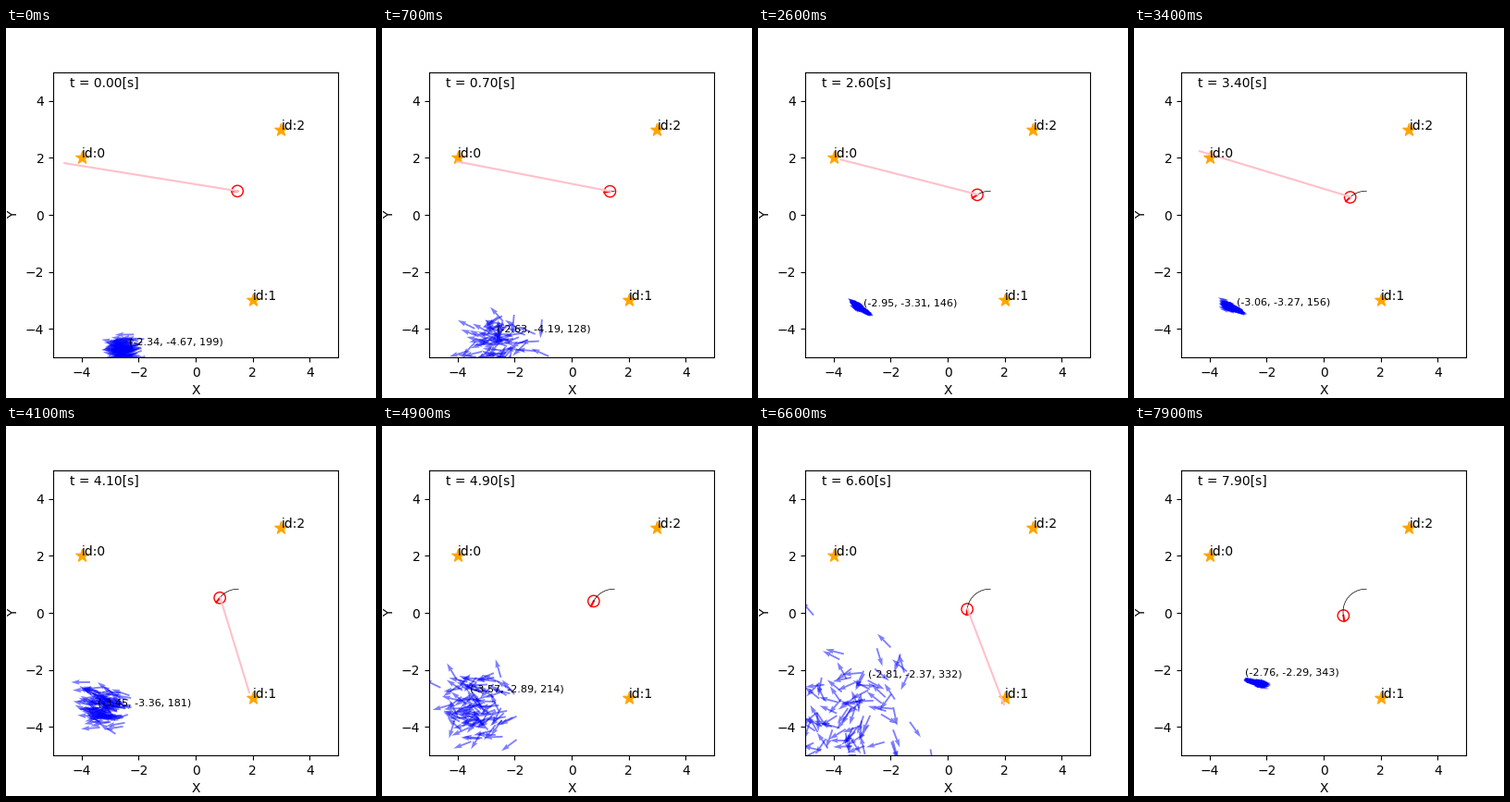
These frames come from a looping animation (400x400 px, 8 s). A matplotlib script:

```python
import numpy as np
import matplotlib.pyplot as plt
from matplotlib.animation import FuncAnimation
from matplotlib.patches import Circle

FRAMES, DT, N = 80, 0.1, 100
OMEGA = np.radians(12.55)
CENTER, RADIUS = (1.477, 0.039), 0.795
LANDMARKS = np.array([(-4, 2), (2, -3), (3, 3)])
rng = np.random.default_rng(7)

# Likeliest pose over time: t, x, y, degrees
GUIDE = np.array([
    (0.0, -2.34, -4.67, 199), (1.3, -2.58, -3.61, 133),
    (2.6, -2.95, -3.31, 146), (3.7, -3.10, -3.25, 160),
    (4.1, -3.45, -3.36, 181), (5.6, -3.28, -3.69, 262),
    (6.6, -2.806, -2.37, 332), (7.9, -2.76, -2.29, 343)])

# First and last step of each spreading phase
BURSTS = [(1, 10), (38, 67)]


def turn(t):
    return np.radians(0.7) + OMEGA * t


def robot(t):
    a = turn(t)
    return CENTER[0] - RADIUS * np.sin(a), CENTER[1] + RADIUS * np.cos(a)


def guide(t):
    x, y, deg = (np.interp(t, GUIDE[:, 0], col) for col in GUIDE.T[1:])
    return np.array([x, y, np.radians(deg)])


def wrap(a):
    return (a + np.pi) % (2 * np.pi) - np.pi


def observe(i):
    """End point of the range reading, or None; every tenth reading is lost."""
    if i % 10 == 9:
        return None
    t = i * DT
    pos = np.array(robot(t))
    for mark in LANDMARKS:
        dx, dy = mark - pos
        dist, ang = np.hypot(dx, dy), np.arctan2(dy, dx)
        if 0.5 < dist < 6 and abs(wrap(ang - np.pi - turn(t))) < np.pi / 3:
            dist *= 1 + 0.1 * np.cos(2 * np.pi * 0.1795 * i)
            ang += np.radians(2) * np.cos(i / 20) + 0.01 * rng.normal()
            return pos + dist * np.array([np.cos(ang), np.sin(ang)])
    return None


def move(p):
    step = OMEGA * RADIUS * DT + 0.025 * rng.normal(size=N)
    p[:, 0] += step * np.cos(p[:, 2])
    p[:, 1] += step * np.sin(p[:, 2])
    p[:, 2] += OMEGA * DT + 0.012 * rng.normal(size=N)


def nearest(p, goal, count):
    d = p - goal
    d[:, 2] = wrap(d[:, 2])
    order = np.argsort((d ** 2).sum(axis=1))[:count]
    return p[np.resize(order, N)]


def gather(goal):
    return goal + rng.normal(size=(N, 3)) * [0.025, 0.025, 0.03]


def simulate():
    p = np.array([-2.2, -4.67, np.radians(191)]) + 0.21 * rng.normal(size=(N, 3))
    for i in range(FRAMES):
        seen, goal, best = observe(i), guide(i * DT), 0
        if i:
            move(p)
        for first, last in BURSTS:
            k = i - last
            if first <= i <= last:
                best = (i - 1) % 5
                if seen is not None:
                    p = p + 0.2 * rng.normal(size=(N, 3))
            elif k in (1, 2):
                p = nearest(p, goal, N // 5 ** k)
            elif k in (3, 5):
                p = gather(goal)
                if k == 3:
                    p[::12] += [0.1, -0.62, 0.03]
        p[0] = goal
        yield p.copy(), best, seen


STATES = list(simulate())

fig = plt.figure(figsize=(4, 4), dpi=100)
ax = fig.add_subplot(111)
ax.set_aspect("equal")
ax.set_xlim(-5, 5)
ax.set_ylim(-5, 5)
ax.set_xlabel("X", fontsize=10)
ax.set_ylabel("Y", fontsize=10)

for k, (x, y) in enumerate(LANDMARKS):
    ax.scatter(x, y, s=100, marker="*", color="orange")
    ax.text(x, y, f"id:{k}", fontsize=10)

clock = ax.text(-4.4, 4.5, "", fontsize=10)
nose, = ax.plot([], [], color="red")
body = ax.add_patch(Circle((0, 0), 0.2, fill=False, color="red"))
trail, = ax.plot([], [], color="black", linewidth=0.5)
beam, = ax.plot([], [], color="pink")
start = STATES[0][0]
arrows = ax.quiver(start[:, 0], start[:, 1], np.cos(start[:, 2]), np.sin(start[:, 2]),
                   angles="xy", scale_units="xy", scale=1.5, color="blue", alpha=0.5)
label = ax.text(0, 0, "", fontsize=8)


def draw(i):
    t = i * DT
    p, best, seen = STATES[i]
    clock.set_text(f"t = {t:.2f}[s]")

    x, y = robot(t)
    th = np.pi + turn(t)
    nose.set_data([x, x + 0.2 * np.cos(th)], [y, y + 0.2 * np.sin(th)])
    body.center = x, y
    trail.set_data(*robot(DT * np.arange(-2, i + 1)))
    if seen is None:
        beam.set_data([], [])
    else:
        x0, y0 = robot(t - DT)
        beam.set_data([x0, seen[0]], [y0, seen[1]])

    arrows.set_offsets(p[:, :2])
    arrows.set_UVC(np.cos(p[:, 2]), np.sin(p[:, 2]))
    bx, by, bth = p[best]
    label.set_position((bx, by + 0.1))
    label.set_text(f"({bx:.2f}, {by:.2f}, {round(np.degrees(bth)) % 360})")
    return clock, nose, body, trail, beam, arrows, label


anim = FuncAnimation(fig, draw, frames=FRAMES, interval=1000 * DT, repeat=True, repeat_delay=0)
plt.show()
```
